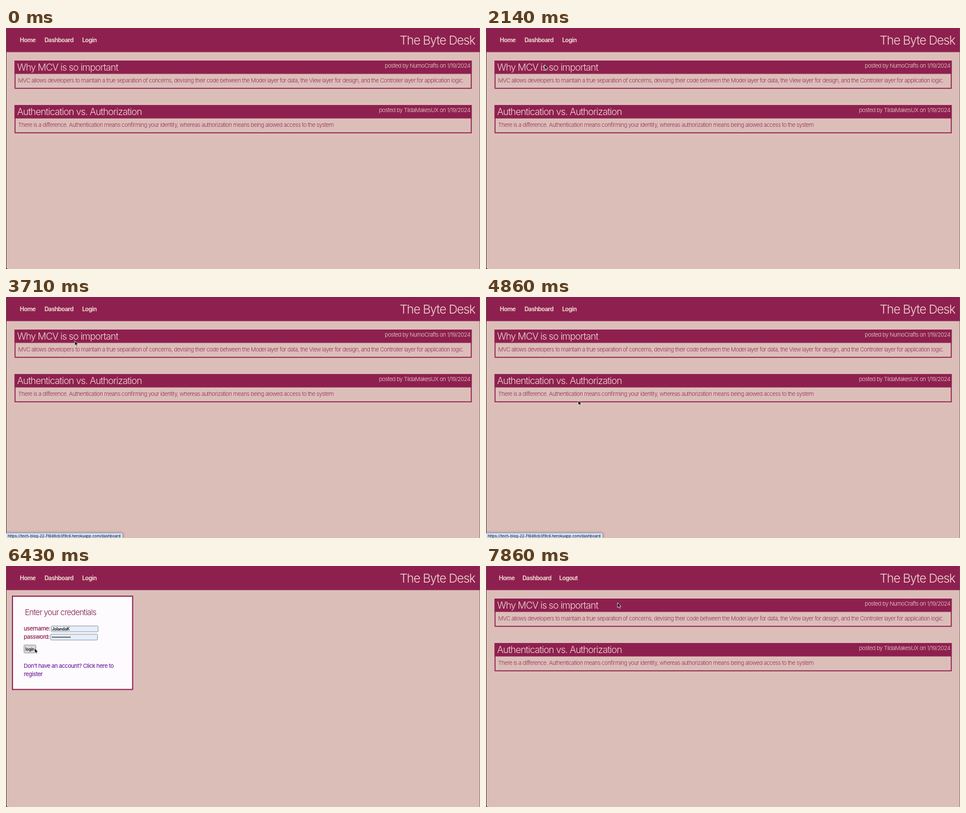
An HTML page that plays this animation: 800x407 px, repeating every 8000 ms.

```html
<!DOCTYPE html>
<html lang="en">
<head>
<meta charset="utf-8">
<title>Blog walkthrough</title>
<style>
html, body { margin: 0; width: 100%; height: 100%; overflow: hidden; background: #dcbeb9; }
svg { display: block; width: 100vw; height: 100vh; }
text { font-family: Inter, "Open Sans", sans-serif; font-size: 9.55px; letter-spacing: -.05em; white-space: pre; }
.brand { font-size: 20.7px; font-weight: 300; fill: #f0d8d2; }
.nav { font-size: 10px; font-weight: 700; fill: #ebd3cd; }
.title { font-size: 16px; font-weight: 300; fill: #f0d9d3; }
.meta { font-weight: 300; fill: #ecd2cc; }
.body { font-weight: 300; fill: #96305c; }
.end { text-anchor: end; }
.form { letter-spacing: -.045em; font-weight: 500; fill: #861a45; }
.head { font-size: 13.3px; font-weight: 350; fill: #7c1540; }
.link { letter-spacing: -.045em; font-weight: 500; fill: #74279a; }
.field { font-size: 7.2px; font-weight: 600; fill: #1d1d24; }
.url { font-size: 6.3px; font-weight: 500; letter-spacing: 0; fill: #1c2233; }
#bubble { filter: drop-shadow(0 0 2px rgba(40, 20, 30, .4)); }
</style>
</head>
<body>
<svg id="stage" viewBox="0 0 800 407" preserveAspectRatio="none">
  <rect width="800" height="407" fill="#dcbeb9"/>
  <rect width="800" height="40.7" fill="#8e204f"/>
  <text class="brand end" x="791.6" y="27.6">The Byte Desk</text>
  <g id="nav"></g>
  <g id="posts"></g>
  <g id="login">
    <rect x="10.9" y="51" width="202.8" height="157.5" fill="#fefbff" stroke="#8e204f" stroke-width="1.8"/>
    <text class="head" x="32" y="83">Enter your credentials</text>
    <text class="form" x="30" y="108.5">username:</text>
    <text class="form" x="30" y="122.5">password:</text>
    <g fill="#e6effc" stroke="#7d8088" stroke-width=".8">
      <rect x="76.4" y="101.3" width="79" height="9.8" rx="1"/>
      <rect x="75.4" y="115.2" width="79" height="9.8" rx="1"/>
      <rect id="button" x="30.4" y="133.4" width="20" height="13.4" rx="1"/>
    </g>
    <text class="field" x="77.4" y="108.8">JolandaK</text>
    <g id="dots" fill="#1d1d24"></g>
    <text class="field" x="32.8" y="142.8" style="font-size:7px">login</text>
    <text class="link" x="30" y="171.5">Don't have an account? Click here to</text>
    <text class="link" x="30" y="185.5">register</text>
  </g>
  <rect width="1" height="407" fill="#5d4a4e"/>
  <rect x="799.4" width=".6" height="407" fill="#6b565a"/>
  <path d="M0 404Q.5 406.5 3 407H0Z" fill="#2a2226"/>
  <g id="status">
    <path id="bubble" fill="#d6e4fb" stroke="#8d97ab" stroke-width=".7"/>
    <text id="url" class="url" x="3" y="405.8"></text>
  </g>
  <path id="arrow" d="M0 0V8.3L1.9 6.6L3.2 9.4L4.6 8.8L3.4 6.1H6Z" fill="#0c0c0c" stroke="#fff" stroke-width=".7" stroke-linejoin="round"/>
  <path id="hand" d="M-.8 .6Q0 -.5 .8 .6V2.9Q1.6 2.4 2.1 3.1Q3 2.6 3.5 3.4Q4.6 3.2 4.6 4.3V6.1L3.7 8.6H-.7L-3 5.2Q-2.8 3.9 -1.7 4.6L-.8 5.4Z" fill="#fff" stroke="#111" stroke-width=".8" stroke-linejoin="round"/>
</svg>
<script>
const LOOP = 8000, STEPS = 56;
const $ = id => document.getElementById(id);
const NS = 'http://www.w3.org/2000/svg';

function add(parent, tag, attrs, text) {
  const el = document.createElementNS(NS, tag);
  for (const key in attrs) el.setAttribute(key, attrs[key]);
  if (text) el.textContent = text;
  parent.appendChild(el);
  return el;
}
const show = (id, on) => $(id).setAttribute('visibility', on ? 'visible' : 'hidden');

function addPost(y, title, meta, body) {
  const g = add($('posts'), 'g', { transform: `translate(0 ${y})` });
  add(g, 'rect', { x: 15.3, y: .8, width: 770, height: 46, fill: 'none', stroke: '#8e204f', 'stroke-width': 1.6 });
  add(g, 'rect', { x: 14.5, y: 0, width: 771.6, height: 22.5, fill: '#8e204f' });
  add(g, 'text', { class: 'title', x: 18.8, y: 16.7 }, title);
  add(g, 'text', { class: 'meta end', x: 783.5, y: 11.7 }, meta);
  add(g, 'text', { class: 'body', x: 20.5, y: 37.3 }, body);
}
addPost(55, 'Why MCV is so important', 'posted by NumoCrafts on 1/19/2024',
  'MVC allows developers to maintain a true separation of concerns, devising their code between the Model layer for data, the View layer for design, and the Controller layer for application logic.');
addPost(130.2, 'Authentication vs. Authorization', 'posted by TildaMakesUX on 1/19/2024',
  'There is a difference. Authentication means confirming your identity, whereas authorization means being alowed access to the system');

for (let i = 0; i < 13; i++) add($('dots'), 'circle', { cx: 78.6 + i * 2.45, cy: 120.2, r: .95 });
const navItems = [0, 1, 2].map(() => add($('nav'), 'text', { class: 'nav', y: 23.6 }));

// Pointer stops: step, x, y
const path = [
  [1, 148, 170], [5, 128, 128], [8, 100, 97], [9, 99, 95], [12, 104, 112], [15, 99, 62],
  [17, 90, 24], [20, 86.5, 21], [24, 88, 23], [25, 98, 44], [26, 116, 74], [27, 116, 74],
  [30, 150, 160], [31, 150, 160], [34, 155.5, 174.5], [35, 157, 180.8], [36, 155, 180],
  [38, 128, 157], [41, 84, 146], [44, 50, 140], [45, 48.3, 138.8], [47, 50, 138],
  [51, 120, 104], [54, 214, 64], [55, 222, 62]
];
function pointerAt(step) {
  const i = Math.max(1, path.findIndex(p => p[0] >= step));
  const [s0, x0, y0] = path[i - 1], [s1, x1, y1] = path[i];
  const u = Math.max(0, (step - s0) / (s1 - s0));
  return [x0 + (x1 - x0) * u, y0 + (y1 - y0) * u];
}

function setStatus(page, right) {
  show('status', page);
  if (!page) return;
  $('url').textContent = 'https://tech-blog-22-f16d8cb3f9c6.herokuapp.com/' + page;
  $('bubble').setAttribute('d', `M-1 398.6H${right - 2}Q${right} 398.6 ${right} 400.6V408H-1Z`);
}

function render(ms) {
  const step = Math.min(STEPS - 1, Math.floor((ms + 5) * STEPS / LOOP));
  const within = (a, b) => step >= a && step < b;
  const loginPage = within(35, 47), signedIn = step >= 47;
  const overNav = within(17, 25), overLink = within(35, 38);

  show('posts', !loginPage);
  show('login', loginPage);
  const labels = ['Home', 'Dashboard', signedIn ? 'Logout' : 'Login'];
  const lefts = signedIn ? [21.7, 61.4, 123.6] : [23.3, 64.9, 128.4];
  navItems.forEach((el, i) => {
    el.textContent = labels[i];
    el.setAttribute('x', lefts[i]);
    el.style.fill = overNav && i === 1 ? '#736a60' : '';
  });
  $('button').setAttribute('fill', within(44, 47) ? '#d9d9dc' : '#efeff1');

  if (within(17, 35)) setStatus('dashboard', 197);
  else if (overLink) setStatus('signup', 185);
  else setStatus('');

  const hand = overNav || overLink;
  const place = `translate(${pointerAt(step).join(' ')})`;
  show('hand', hand);
  show('arrow', step > 0 && !hand);
  $('hand').setAttribute('transform', place);
  $('arrow').setAttribute('transform', place);
}

function tick() {
  render(performance.now() % LOOP);
  requestAnimationFrame(tick);
}
tick();
</script>
</body>
</html>
```
